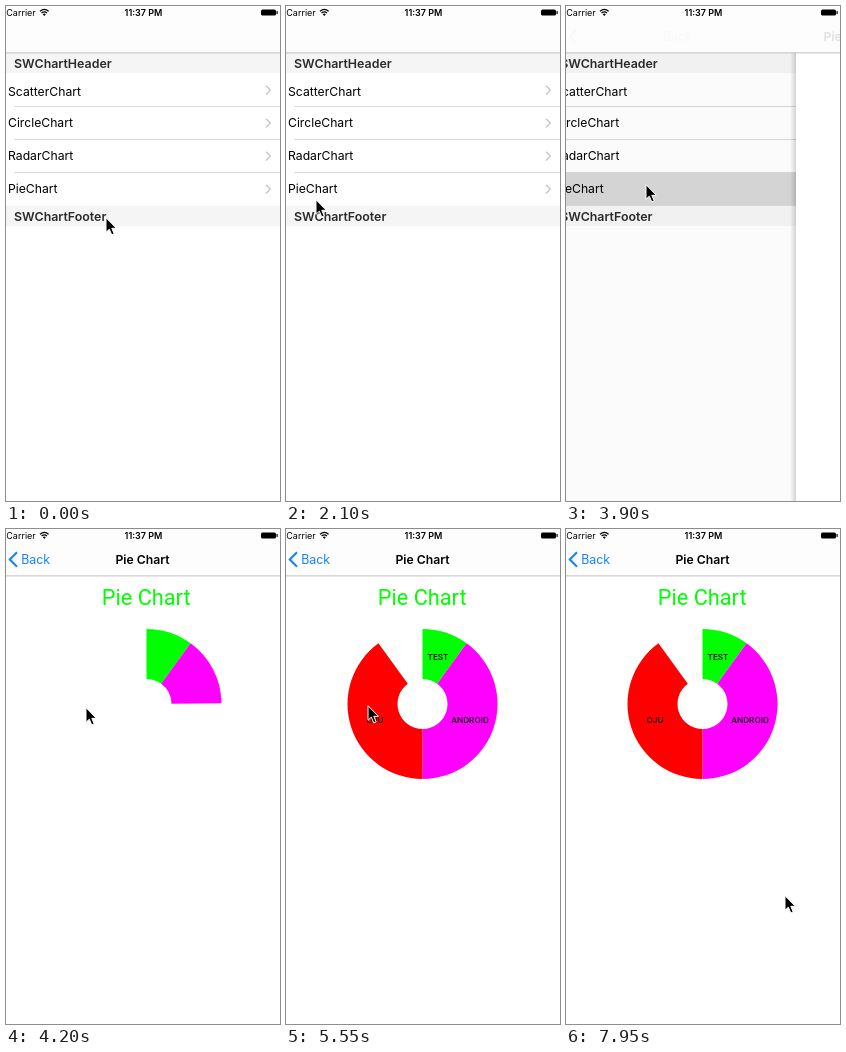
An HTML page for the animation above (8000 ms loop, 274 px wide and 495 px high).

```html
<!DOCTYPE html>
<html lang="en">
<head>
<meta charset="utf-8">
<title>Pie Chart</title>
<style>
  html, body { margin: 0; width: 100%; height: 100%; overflow: hidden; background: #fff; }
  svg { display: block; width: 274px; height: 495px; font: 12.2px Inter, sans-serif; }
  .bold { font-weight: 600; }
  .head { font-size: 12.4px; font-weight: 600; fill: #2b2b2d; }
  .status { font-size: 9px; }
  .title { font: 21.7px Roboto, sans-serif; fill: #0f0; }
  .labels { font-size: 8.2px; font-weight: 500; }
  .mid { text-anchor: middle; }
  .line { fill: none; }
</style>
</head>
<body>
<svg viewBox="0 0 274 495">
  <defs>
    <linearGradient id="shade">
      <stop offset="0" stop-opacity="0"/>
      <stop offset="1" stop-opacity=".16"/>
    </linearGradient>
  </defs>

  <g id="list">
    <rect y="47" width="274" height="20" fill="#f5f5f5"/>
    <text class="head" x="8" y="62">SWChartHeader</text>
    <rect id="selection" y="167" width="274" height="33" fill="#d7d7d7"/>
    <g id="rows"></g>
    <rect y="200" width="274" height="20" fill="#f5f5f5"/>
    <text class="head" x="8" y="215">SWChartFooter</text>
  </g>
  <rect id="dim" width="274" height="495"/>

  <g id="detail">
    <rect x="-6" width="6" height="495" fill="url(#shade)"/>
    <rect width="274" height="495" fill="#fff"/>
    <text class="title mid" x="136.2" y="76">Pie Chart</text>
    <g id="pie" transform="translate(136.5 175)"></g>
    <g id="labels" class="labels mid">
      <text x="152" y="131">TEST</text>
      <text x="184" y="194">ANDROID</text>
      <text x="89" y="194">OJU</text>
    </g>
  </g>

  <rect width="274" height="46.4" fill="#fdfdfd"/>
  <rect y="46.4" width="274" height="1" fill="#c0c0c0"/>
  <text class="status" x="0.3" y="10">Carrier</text>
  <g class="line" stroke="#000" stroke-width="1.3">
    <path d="M34 5.2Q38.3 1.6 42.6 5.2M35.6 7Q38.3 4.8 41 7"/>
  </g>
  <path d="M36.8 8.2Q38.3 7 39.8 8.2L38.3 10Z"/>
  <text class="status bold mid" x="137.5" y="10">11:37 PM</text>
  <rect x="255" y="3.4" width="15" height="6.2" rx="1.5"/>
  <rect x="270.5" y="5" width="1.2" height="3" rx=".6"/>

  <g id="back" fill="#1683fb">
    <path class="line" d="M11 23.2L3.8 30.5L11 37.8" stroke="#1683fb" stroke-width="2.1"/>
    <text id="backText" x="15.2" y="35" font-size="12.4">Back</text>
  </g>
  <text id="navTitle" class="bold mid" x="136.5" y="35">Pie Chart</text>

  <path id="cursor" d="M0 0V14.6L3.3 11.5L5.8 17.2L8.2 16.2L5.8 10.6H10.4Z" stroke="#fff"/>
</svg>
<script>
const LOOP = 8000, STEP = 150, WIDTH = 274;
const PUSH_START = 3861, PIE_START = 3855, LABEL_START = 4861;
const $ = id => document.getElementById(id);
const clamp = v => Math.max(0, Math.min(1, v));
const move = (id, x, y = 0) => $(id).setAttribute('transform', `translate(${x} ${y})`);
const fade = (id, v) => $(id).setAttribute('opacity', v);
const show = (id, on) => { $(id).style.display = on ? '' : 'none'; };

// Pointer stops: time, x, y
const pointer = [
  [0, 100, 212], [900, 100, 212], [1350, 55, 279], [1800, 6, 160], [1950, 4, 166],
  [2100, 30, 194], [2850, 80, 179], [5400, 80, 179], [5550, 82, 177], [5850, 85, 262],
  [6300, 85, 262], [6450, 46, 234], [6600, 27, 220], [7050, 140, 329],
  [7200, 173, 317], [7500, 173, 317], [7950, 219, 367]
];

// Slices: colour, start and end angle
const slices = [['#0f0', 0, 36], ['#f0f', 36, 180], ['#f00', 180, 324]];

$('rows').innerHTML = ['ScatterChart', 'CircleChart', 'RadarChart', 'PieChart'].map((name, i) => {
  const y = 67 + 33 * i;
  return `<text x="2" y="${y + (i ? 21 : 23.2)}">${name}</text>
    <path class="line" d="M260 ${y + 12.7}l4.3 4.4l-4.3 4.4" stroke="#c4c4c8" stroke-width="1.3"/>
    ${i < 3 ? `<rect x="8" y="${y + 33}" width="266" height="1" fill="#d9d9dc"/>` : ''}`;
}).join('');

$('pie').innerHTML = slices.map(([color]) => `<path fill="${color}"/>`).join('');

// Ring sector, angles in degrees clockwise from the top
function sector(from, to) {
  if (to <= from) return '';
  const at = (r, deg) => {
    const a = deg * Math.PI / 180;
    return `${r * Math.sin(a)} ${-r * Math.cos(a)}`;
  };
  return `M${at(75, from)}A75 75 0 0 1 ${at(75, to)}L${at(25, to)}A25 25 0 0 0 ${at(25, from)}Z`;
}

function pointerAt(t) {
  const i = pointer.findIndex(p => p[0] > t);
  if (i < 0) return pointer[pointer.length - 1].slice(1);
  const [a, b] = [pointer[i - 1], pointer[i]];
  const k = (t - a[0]) / (b[0] - a[0]);
  return [a[1] + (b[1] - a[1]) * k, a[2] + (b[2] - a[2]) * k];
}

// cubic-bezier(.42, 0, .58, 1)
function easeInOut(x) {
  let lo = 0, hi = 1;
  for (let i = 0; i < 20; i++) {
    const s = (lo + hi) / 2, r = 1 - s;
    if (1.26 * s * r * r + 1.74 * s * s * r + s ** 3 < x) lo = s; else hi = s;
  }
  return lo * lo * (3 - 2 * lo);
}

function draw(t) {
  // Critically damped spring: share of the push still to go
  const w = Math.max(0, t - PUSH_START) * 0.0183;
  const rest = (1 + w) * Math.exp(-w);
  const pushed = t >= PUSH_START;
  // The bar and the outgoing list settle just before the spring does
  const barRest = Math.max(0, 1.02 * rest - 0.02), done = 1 - barRest;

  move('list', -0.315 * WIDTH * (1 - rest));
  show('list', barRest > 0);
  fade('dim', barRest > 0 ? 0.1 * done : 0);
  show('selection', pushed);
  show('detail', pushed);
  move('detail', WIDTH * rest);
  move('backText', 98 * barRest);
  move('navTitle', 177 * barRest);
  fade('back', done ** 2);
  fade('navTitle', done ** 1.2);

  const sweep = 360 * easeInOut(clamp((t - PIE_START) / 1000));
  slices.forEach(([, from, to], i) =>
    $('pie').children[i].setAttribute('d', sector(from, Math.min(to, sweep))));
  fade('labels', clamp((t - LABEL_START) / 239));

  // The shadow belongs to the moving edge only
  $('detail').firstElementChild.style.display = barRest > 0 ? '' : 'none';

  const [x, y] = pointerAt(t);
  move('cursor', x, y - 0.3);
}

const start = performance.now();
function tick() {
  const t = (performance.now() - start) % LOOP;
  draw(Math.floor(t / STEP) * STEP);
  requestAnimationFrame(tick);
}
tick();
</script>
</body>
</html>
```
